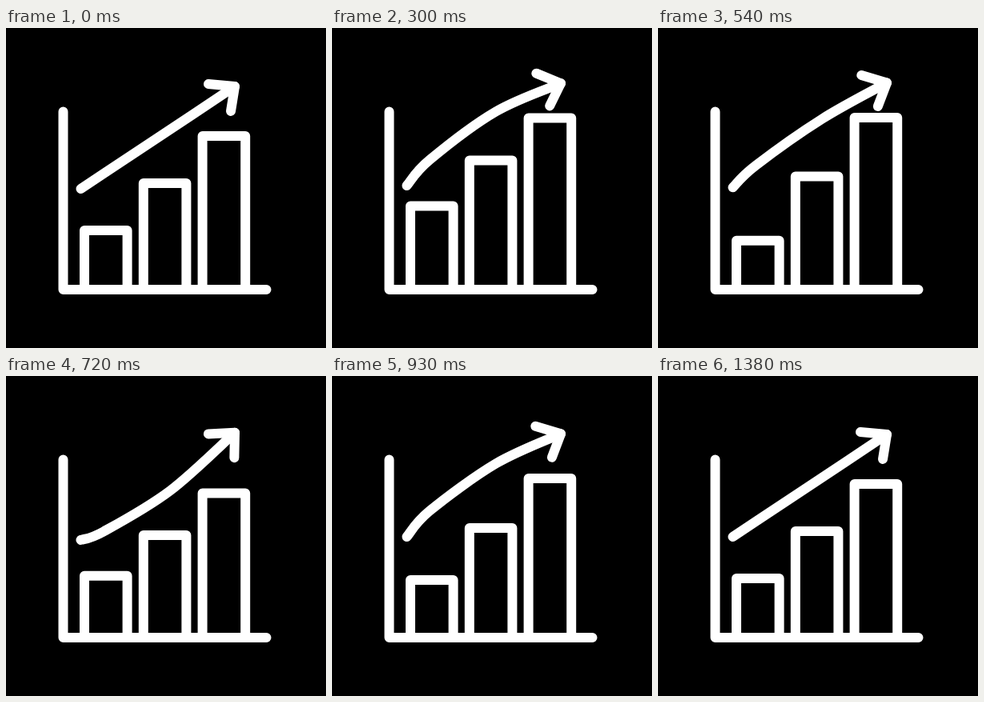
Write an HTML page that moves like this. It is 400x400 px and loops after 1670 ms.

```html
<!DOCTYPE html>
<html lang="en">
<head>
<meta charset="utf-8">
<title>Growth chart</title>
<style>
  html, body { margin: 0; height: 100%; overflow: hidden; background: #000; }
  svg { display: block; width: 100%; height: 100%; }
  path { fill: none; stroke: #fff; stroke-width: 12; stroke-linecap: round; stroke-linejoin: round; }
</style>
</head>
<body>
<svg viewBox="0 0 400 400">
  <path d="M71.5 104.5V327H325.5"/>
  <path class="bar"/>
  <path class="bar"/>
  <path class="bar"/>
  <path id="shaft"/>
  <path id="head" d="M-33-3L0 0L-5 31"/>
</svg>
<script>
const LOOP = 1670, STEP = 30;
const swing = x => (1 - Math.cos(Math.PI * x)) / 2;
const rise = x => Math.sin(Math.PI / 2 * x);
const fall = x => x * x;

// Keys are [time, value, easing into this key].
const barKeys = [[0, 0], [295, 30.5, rise], [537, -12.7, fall], [795, 7], [965, -3], [1200, 0]];
const bendKeys = [[50, 0], [420, 27], [715, -15], [925, 16], [1190, 0]];
const turnKeys = [[40, 0], [420, 22], [720, -8], [925, 11.5], [1190, 0]];
const tailKeys = [[20, 0], [420, 5], [710, -4], [930, 0]];
const tipKeys = [[50, 73], [420, 68], [925, 72.3], [1190, 73]];

function valueAt(keys, t) {
  if (t <= keys[0][0]) return keys[0][1];
  const i = keys.findIndex(key => key[0] > t);
  if (i < 0) return keys[keys.length - 1][1];
  const [t0, v0] = keys[i - 1], [t1, v1, ease = swing] = keys[i];
  return v0 + (v1 - v0) * ease((t - t0) / (t1 - t0));
}

// Smooth curve through all points.
function curve(points) {
  let d = "M" + points[0];
  for (let i = 0; i < points.length - 1; i++) {
    const a = points[i], b = points[i + 1];
    const before = points[i - 1] || a, after = points[i + 2] || b;
    const c1 = a.map((v, k) => v + (b[k] - before[k]) / 6);
    const c2 = b.map((v, k) => v - (after[k] - a[k]) / 6);
    d += `C${c1} ${c2} ${b}`;
  }
  return d;
}

const bars = document.querySelectorAll(".bar");
const shaft = document.getElementById("shaft");
const head = document.getElementById("head");

function draw(t) {
  bars.forEach((bar, i) => {
    const x = 98 + 73.8 * i;
    const y = 253 - 59 * i - valueAt(barKeys, t - 72 * i);
    bar.setAttribute("d", `M${x} 327V${y}h53.6V327`);
  });
  const bend = valueAt(bendKeys, t);
  const tipY = valueAt(tipKeys, t);
  shaft.setAttribute("d", curve([
    [93.5, 201 - valueAt(tailKeys, t)],
    [122, 182 - 0.83 * bend],
    [205, 127 - 1.1 * bend],
    [286, tipY]
  ]));
  head.setAttribute("transform", `translate(286 ${tipY}) rotate(${valueAt(turnKeys, t)})`);
}

function frame() {
  draw(Math.floor(performance.now() % LOOP / STEP) * STEP);
  requestAnimationFrame(frame);
}
frame();
</script>
</body>
</html>
```
